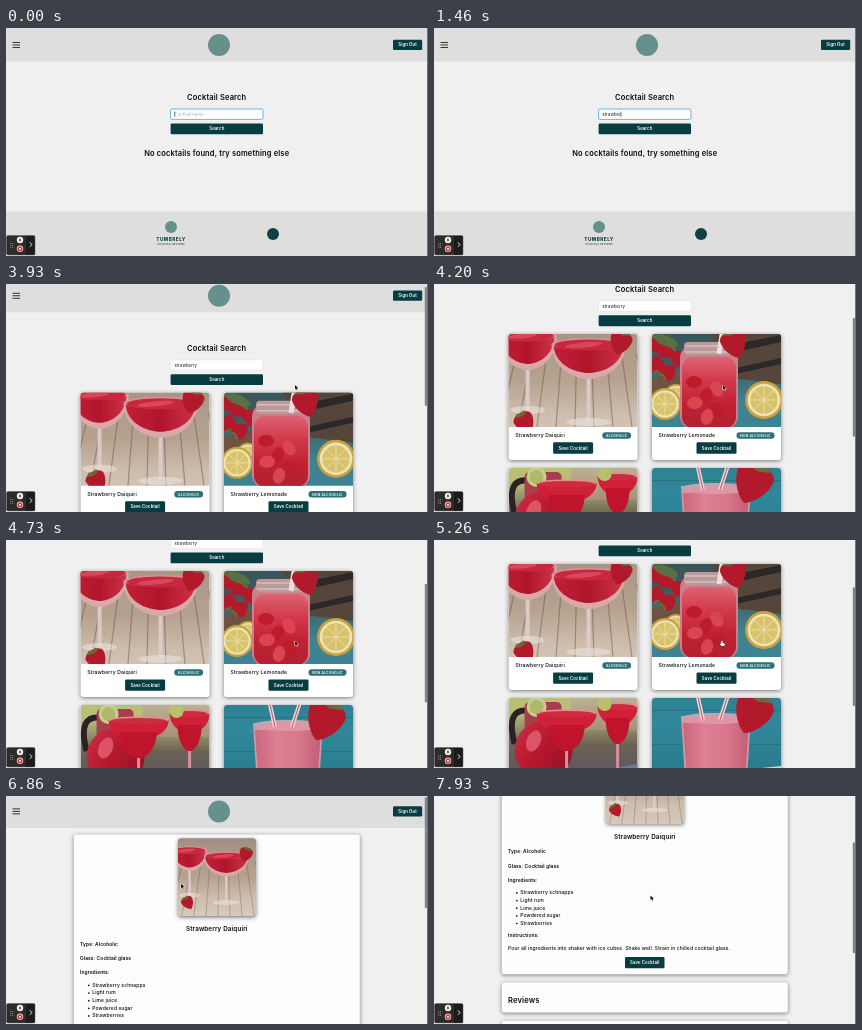
Animation, 422 px wide and 228 px high, one loop 8 s. Source, as an HTML page with a canvas:

```html
<!DOCTYPE html>
<html lang="en">
<head>
<meta charset="utf-8">
<title>Cocktail Search</title>
<style>
  html, body { margin: 0; width: 100%; height: 100%; overflow: hidden; background: #f0f0f0; }
  canvas { display: block; width: 422px; height: 228px; }
</style>
</head>
<body>
<canvas id="stage"></canvas>
<script>
const W = 422, H = 228, LOOP = 8000;
const DARK = '#073d40', HOVER = '#2f4f4f', BAR = '#dedede', MARK = '#66908b';
const canvas = document.getElementById('stage');
const ratio = window.devicePixelRatio || 1;
canvas.width = W * ratio;
canvas.height = H * ratio;
const c = canvas.getContext('2d');

const smooth = p => p * p * (3 - 2 * p);

// Value at time t along [time, value] stops.
function track(t, stops, ease = p => p) {
  if (t <= stops[0][0]) return stops[0][1];
  for (let i = 1; i < stops.length; i++) {
    const [t0, a] = stops[i - 1], [t1, b] = stops[i];
    if (t < t1) return a + (b - a) * ease((t - t0) / (t1 - t0));
  }
  return stops[stops.length - 1][1];
}

// ---------- drawing helpers ----------
function rect(x, y, w, h, color) {
  c.fillStyle = color;
  c.fillRect(x, y, w, h);
}
function round(x, y, w, h, r, color, border) {
  c.beginPath();
  c.roundRect(x, y, w, h, r);
  if (color) { c.fillStyle = color; c.fill(); }
  if (border) { c.strokeStyle = border; c.stroke(); }
}
function oval(x, y, rx, ry, color, turn = 0) {
  c.beginPath();
  c.ellipse(x, y, rx, ry, turn, 0, Math.PI * 2);
  c.fillStyle = color;
  c.fill();
}
const disc = (x, y, r, color) => oval(x, y, r, r, color);
function path(d, color) {
  c.fillStyle = color;
  c.fill(new Path2D(d));
}
function stroke(d, color, width) {
  c.strokeStyle = color;
  c.lineWidth = width;
  c.stroke(new Path2D(d));
}
function fade(x0, y0, x1, y1, ...colors) {
  const g = c.createLinearGradient(x0, y0, x1, y1);
  colors.forEach((color, i) => g.addColorStop(i / (colors.length - 1), color));
  return g;
}
// y is the middle of the capitals.
function text(s, x, y, size, weight = 600, color = '#0c0c0c', align = 'left', gap = 0.02) {
  c.font = `${weight} ${size}px Montserrat, Inter, sans-serif`;
  c.letterSpacing = gap * size + 'px';
  c.textAlign = align;
  c.fillStyle = color;
  c.fillText(s, x, y + size * 0.36);
}
function shadowed(blur, draw) {
  c.save();
  c.shadowColor = 'rgba(0,0,0,.5)';
  c.shadowBlur = blur * ratio;
  c.shadowOffsetY = ratio;
  draw();
  c.restore();
}
function button(label, x, y, w, h, color = DARK) {
  round(x, y, w, h, 1.3, color);
  text(label, x + w / 2, y + h / 2, 4.3, 600, '#fff', 'center');
}

// ---------- pictures, each on a square from (0,-18) to (129,111) ----------
const backdrop = (...colors) => rect(0, -18, 129, 129, fade(0, -18, 0, 111, ...colors));

function berry(x, y, r, turn = 0) {
  c.save();
  c.translate(x, y);
  c.rotate(turn);
  c.scale(r / 10, r / 10);
  path('M-10-4C-9-12 9-12 10-4C10 4 3 11 0 12C-3 11-10 4-10-4Z', '#b21a2b');
  path('M-7-8L-3-11L0-9L4-11L7-8L0-6Z', '#6b6a3a');
  c.restore();
}
function bowl(x, y, r, depth, color) {
  path(`M${x - r} ${y}C${x - r} ${y + depth * 0.7} ${x - r * 0.4} ${y + depth} ${x} ${y + depth}
    S${x + r} ${y + depth * 0.7} ${x + r} ${y}Z`, color);
}
function coupe(x, y, r, foot) {
  stroke(`M${x} ${y + 30}V${foot}`, '#ddcac8', 4);
  oval(x, foot, r * 0.6, 4, 'rgba(235,226,220,.6)');
  bowl(x, y, r, 35, '#d9a9aa');
  bowl(x, y, r - 2, 29, fade(x - r, 0, x + r, 0, '#c22038', '#b0152c', '#cf3549'));
  oval(x, y, r, 6, '#dc8d95');
  oval(x, y + 1, r - 3, 5.5, '#c9273f');
  oval(x - 5, y + 1, r * 0.5, 2.5, '#d9485a', -0.1);
}
function lemon(x, y, r) {
  disc(x, y, r, '#c9a23c');
  disc(x, y, r * 0.86, '#ece3bb');
  disc(x, y, r * 0.72, '#d8c36a');
  for (let i = 0; i < 4; i++) {
    const a = i * Math.PI / 4, dx = Math.cos(a) * r * 0.7, dy = Math.sin(a) * r * 0.7;
    stroke(`M${x - dx} ${y - dy}L${x + dx} ${y + dy}`, '#ece3bb', 0.8);
  }
}
function margarita(x, y, r, foot) {
  stroke(`M${x} ${y + 30}V${foot}`, '#d58f9d', 3);
  bowl(x, y, r, 20, '#cf2038');
  bowl(x, y + 12, r * 0.6, 26, '#bf142c');
  oval(x, y, r, 3.5, '#e58b92');
  oval(x, y + 1, r - 2, 3, '#cc2b40');
}

function daiquiri() {
  backdrop('#a08f80', '#ad9a89', '#b6a28f', '#cdbdad', '#d6c9bb');
  for (let i = 0; i < 9; i++) stroke(`M${i * 20 - 14} 111L${8 + i * 15} 20`, 'rgba(98,76,60,.45)', 1.2);
  coupe(19, 1, 29, 76);
  coupe(80, 10, 37, 88);
  berry(112, 8, 11, 0.3);
  berry(16, 88, 10, -0.5);
}
function lemonade() {
  backdrop('#35535a', '#3d5a5c', '#41818f', '#3a8596');
  path('M50-18H129V50L80 44Z', '#56453b');
  path('M84 10L129 1V8L84 18ZM84 34L129 24V30L84 40Z', '#2c2827');
  path('M0 44L40 36V56L0 60Z', '#6d5342');
  for (let i = 0; i < 5; i++) berry(4 + (i * 11) % 32, 10 + i * 7, 8, i);
  oval(14, 7, 13, 5, '#587043', 0.4);
  lemon(24, 62, 12);
  lemon(13, 70, 16);
  lemon(112, 66, 19);
  round(28, 11, 58, 84, 13, '#c98088');
  round(30, 23, 54, 71, 11, fade(0, 23, 0, 93, '#dc6372', '#d2394b', '#c02234', '#b3202f'));
  for (let i = 0; i < 6; i++) oval(42 + (i * 23) % 34, 48 + i * 7, 8, 6, i % 2 ? '#d94650' : '#bd1c2d', i);
  round(32, 8, 50, 13, 4, '#bb9a9b');
  stroke('M33 12H81M33 18H81', '#e3cfcd', 1);
  stroke('M67 20L73 -18', '#eadfdc', 5);
  berry(82, 9, 13, -0.3);
}
function pitcher() {
  backdrop('#b6c56a', '#b9bd7c', '#6c6254', '#5c5560', '#77809c');
  rect(62, -18, 67, 50, fade(0, -18, 0, 32, '#c3c59a', '#a98f7c'));
  path('M0 80L129 70V111H0Z', '#77507f');
  path('M60 78L129 66V111H60Z', '#697ba0');
  stroke('M22 13Q-4 8 6 46', '#2b2024', 6);
  round(16, 4, 37, 40, 5, '#a93d4d');
  disc(35, 52, 29, fade(6, 30, 64, 75, '#ce2c42', '#b3172d', '#8e1226'));
  oval(25, 43, 7, 11, '#dc5566', 0.4);
  disc(28, 9, 10, '#c6cf8e');
  disc(28, 9, 7, '#aeba68');
  margarita(109, 8, 20, 78);
  margarita(58, 15, 30, 82);
  disc(96, 6, 7, '#b7c16c');
}
function smoothie() {
  backdrop('#2c7d8e', '#31889a', '#297c8e', '#266f80');
  for (let y = 12; y < 80; y += 34) rect(0, y, 129, 0.8, '#286c7b');
  path('M0 80L40 76V111H0Z', '#7d7468');
  path('M90 72L129 68V111H80Z', '#ddd3c6');
  for (let i = 0; i < 14; i++) disc(95 + (i * 11) % 33, 74 + (i * 7) % 24, 2.4, i % 3 ? '#c6354c' : '#809b45');
  path('M29 18H99L93 111H35Z', '#cf9ba7');
  path('M31 25H97L91 111H37Z', fade(30, 0, 98, 0, '#c9657c', '#de7f93', '#d8778c', '#c25c75'));
  oval(64, 20, 35, 5, '#c3a4ae');
  oval(64, 22, 32, 4, '#de95a4');
  stroke('M51 22L42 -18M68 22L81 -18', '#ecd9da', 4);
  stroke('M51 22L42 -18M68 22L81 -18', '#cb6272', 1.2);
  berry(101, 14, 19, 0.4);
}

function picture(draw, x, y, w, h, corners) {
  c.save();
  c.beginPath();
  c.roundRect(x, y, w, h, corners);
  c.clip();
  c.translate(x, y + h / 2);
  c.scale(w / 129, w / 129);
  c.translate(0, -46.5);
  draw();
  c.restore();
}

// ---------- page parts ----------
function header() {
  rect(0, 0, W, 33.5, BAR);
  for (const y of [14, 16.5, 19]) rect(6.5, y, 7.5, 0.9, '#222');
  disc(213, 17, 11, MARK);
  button('Sign Out', 387, 11.7, 29.2, 10.3);
}
function footer(y) {
  rect(0, y, W, 45, BAR);
  disc(165, y + 15.5, 6, MARK);
  text('TUMBRELY', 165, y + 28.3, 4.7, 800, '#174546', 'center', 0.1);
  text('COCKTAIL REVIEWS', 165, y + 32.8, 2.5, 600, '#2f5758', 'center', 0.08);
  disc(267, y + 22.5, 6, '#123f43');
}
function scrollbar(y, pageHeight) {
  round(418.8, y * H / pageHeight + 0.4, 2.2, H * H / pageHeight, 1.1, '#858585');
}

const drinks = [
  ['Strawberry Daiquiri', 'ALCOHOLIC', daiquiri],
  ['Strawberry Lemonade', 'NON ALCOHOLIC', lemonade],
  ['Strawberry Margarita', 'ALCOHOLIC', pitcher],
  ['Strawberry Smoothie', 'NON ALCOHOLIC', smoothie]
];
function card([name, kind, draw], x, y) {
  shadowed(4, () => round(x, y, 129, 126, 3, '#fff'));
  picture(draw, x, y, 129, 93, [3, 3, 0, 0]);
  text(name, x + 6.6, y + 101.5, 5.15, 500);
  const w = kind.length > 9 ? 38 : 28.8;
  round(x + 122.5 - w, y + 98.3, w, 6.5, 3.25, '#2d7077');
  text(kind, x + 122.5 - w / 2, y + 101.6, 3.3, 700, '#e8f2f2', 'center', 0.06);
  button('Save Cocktail', x + 44.5, y + 108.4, 40, 11.4);
}

const QUERY = 'strawberry';
const KEYS = [190, 330, 460, 600, 800, 1060, 1330, 1460, 1600, 1930];
const CLICK = 2470, RESULTS = 2900, DETAIL = 6530;

function form(t, hover) {
  const waiting = t >= CLICK && t < RESULTS, focused = t < CLICK;
  const x = waiting ? 165.6 : 164.6, w = waiting ? 90.6 : 92.4;
  const typed = QUERY.slice(0, KEYS.filter(k => k <= t).length);
  text('Cocktail Search', 210.7, 69, 7.5, 600, '#0c0c0c', 'center');
  c.lineWidth = focused ? 1 : 0.5;
  round(x, 81, w, 10.4, 1.3, '#fff', focused ? '#6fb1e6' : '#dcdcdc');
  if (typed) text(typed, x + 4, 86.5, 4.2, 400, '#151515');
  else text('Cocktail name', x + 4, 86.5, 4.2, 400, '#b4b4b4');
  if (focused && t % 1000 < 560) {
    c.font = '400 4.2px Montserrat, Inter, sans-serif';
    c.letterSpacing = '0.084px';
    rect(x + 3.9 + c.measureText(typed).width, 83.6, 0.6, 5.2, '#222');
  }
  button('Search', x, 95.4, w, 10.8, hover ? HOVER : DARK);
}

function searchPage(t, scroll) {
  const done = t >= RESULTS;
  c.save();
  c.translate(0, -scroll);
  header();
  form(t, t >= 2270 && t < 3440);
  if (done) {
    drinks.forEach((d, i) => card(d, i % 2 ? 218 : 74.6, i < 2 ? 114 : 248));
    footer(392);
  } else {
    const note = t < CLICK ? 'No cocktails found, try something else' : 'Search to find cocktails!';
    text(note, 210.7, 125.5, 7.5, 600, '#0c0c0c', 'center');
    footer(183.5);
  }
  c.restore();
  if (done) scrollbar(scroll, 437);
}

function detailPage(scroll) {
  const panel = (y, h) => shadowed(4, () => round(67.8, y, 286, h, 3, '#fdfdfd'));
  c.save();
  c.translate(0, -scroll);
  header();
  panel(40, 232.3);
  shadowed(4, () => round(172, 44, 78, 78, 3, '#8e7b71'));
  picture(daiquiri, 172, 44, 78, 78, 3);
  text('Strawberry Daiquiri', 210.8, 134.3, 6.3, 600, '#0c0c0c', 'center');
  text('Type: Alcoholic', 74, 149.6, 4.9);
  text('Glass: Cocktail glass', 74, 163.8, 4.9);
  text('Ingredients:', 74, 178, 4.9);
  ['Strawberry schnapps', 'Light rum', 'Lime juice', 'Powdered sugar', 'Strawberries'].forEach((s, i) => {
    const y = 190.6 + i * 7.65;
    disc(82.8, y + 0.3, 0.85, '#111');
    text(s, 86.2, y, 5, 500);
  });
  text('Instructions:', 74, 233.7, 4.9);
  text('Pour all ingredients into shaker with ice cubes. Shake well. Strain in chilled cocktail glass.', 74, 246.4, 5, 500);
  button('Save Cocktail', 191, 255, 39.5, 11.2);
  panel(280.6, 30);
  text('Reviews', 74, 298.7, 7.6);
  panel(318.8, 90);
  footer(423.5);
  c.restore();
  scrollbar(scroll, 468);
}

function recorder() {
  round(0.5, 207.5, 28.5, 19.5, 1.5, '#2c2c2c', '#555');
  rect(20, 208, 8.5, 18.5, '#1c1c1c');
  for (let i = 0; i < 6; i++) disc(4.8 + (i % 2) * 1.9, 215.5 + (i >> 1) * 2, 0.5, '#aaa');
  disc(14, 212, 3.2, '#f4f4f4');
  rect(13, 210.6, 0.7, 2.8, '#333');
  rect(14.4, 210.6, 0.7, 2.8, '#333');
  disc(14, 220.8, 3.2, '#f3ecec');
  disc(14, 220.8, 2.6, '#e03438');
  rect(13.1, 219.9, 1.8, 1.8, '#fff');
  stroke('M23.8 214.3L26 216.5L23.8 218.7', '#fff', 0.9);
}

const ARROW = 'M0 0V4.6L1.1 3.6L1.9 5.3L2.7 4.9L2 3.3H3.4Z';
const HAND = 'M-.7 0Q0-.8.7 0V2L2.6 2.5Q3 2.7 2.8 4L2.2 5H-.8L-2.3 2.8L-1.8 2.3L-.7 3Z';

function pointer(t) {
  if (t < 2000) return;
  const x = track(t, [[2000, 242], [2330, 225], [3400, 225], [3720, 289], [5000, 289], [5260, 288],
    [6060, 168], [6800, 168], [7100, 233], [7780, 233], [7930, 216.5]], smooth);
  const y = track(t, [[2000, 70], [2330, 101], [5000, 101], [5260, 101],
    [6060, 85.5], [6800, 85.5], [7100, 106], [7780, 106], [7930, 99.5]], smooth);
  const hand = (t > 2270 && t < 3440) || (t > 5000 && t < DETAIL);
  c.save();
  c.translate(x, y);
  c.lineJoin = 'round';
  stroke(hand ? HAND : ARROW, hand ? '#222' : '#fff', 0.9);
  path(hand ? HAND : ARROW, hand ? '#fff' : '#111');
  c.restore();
}

function draw(t) {
  c.setTransform(ratio, 0, 0, ratio, 0, 0);
  rect(0, 0, W, H, t >= CLICK && t < RESULTS ? '#f2f2f0' : '#f0f0f0');
  if (t < DETAIL) {
    searchPage(t, track(t, [[3780, 0], [3930, 5], [4020, 22], [4200, 64], [4260, 66], [4460, 66],
      [4730, 83], [4800, 84], [5000, 84], [5260, 90], [6060, 100]]));
  } else {
    detailPage(track(t, [[6800, 0], [7600, 94]], smooth));
  }
  rect(421.2, 0, 0.8, H, '#555');
  c.lineWidth = 0.5;
  recorder();
  pointer(t);
}

const start = performance.now();
function tick() {
  draw((performance.now() - start) % LOOP);
  requestAnimationFrame(tick);
}
tick();
</script>
</body>
</html>
```
